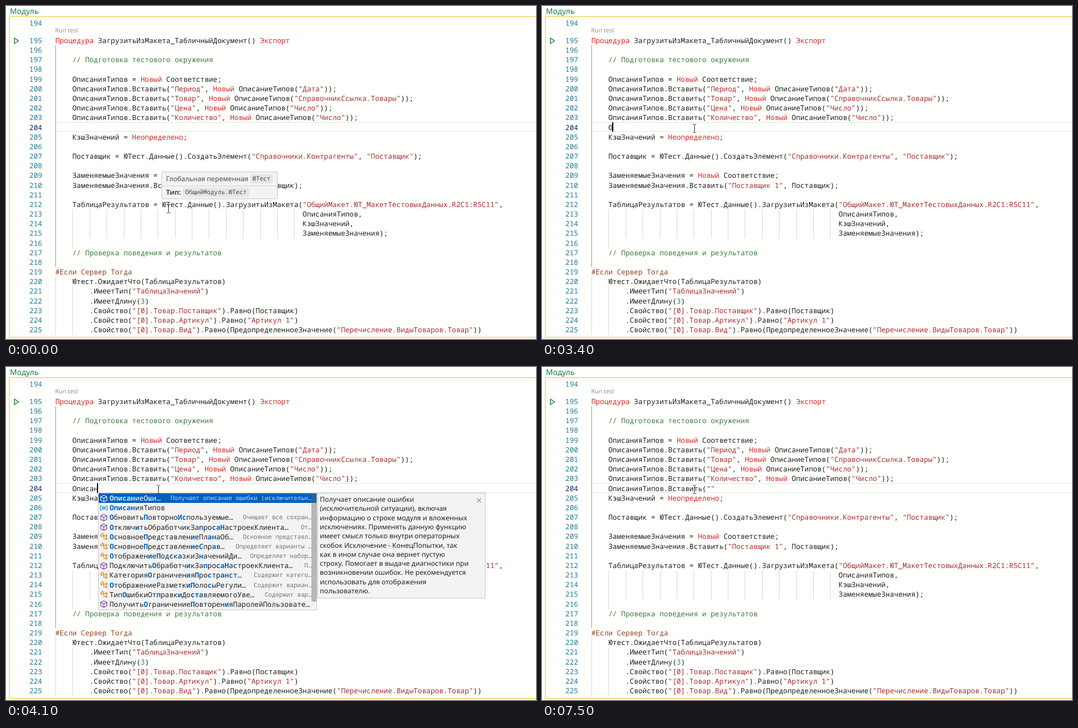
These frames come from a looping animation (944 px wide and 593 px high, 8 s). An HTML page:

```html
<!DOCTYPE html>
<html lang="ru">
<head>
<meta charset="utf-8">
<title>Модуль</title>
<style>
html, body { margin: 0; width: 100%; height: 100%; overflow: hidden; background: #fff; }
body { position: relative; text-rendering: geometricPrecision; color: #1c1c1c;
  font: 12.66px/17.17px "Noto Sans Mono", "DejaVu Sans Mono", monospace; }
div, svg { position: absolute; box-sizing: border-box; white-space: pre; }
#stage { left: 0; top: 0; width: 944px; height: 593px; overflow: hidden; }
.sans { font-family: "Noto Sans", "Open Sans", sans-serif; }
.title { left: 7px; top: .6px; font-size: 13.7px; color: #14794a; }
.frame { left: 5px; top: 18px; width: 960px; height: 573px; border: 2px solid #f6df7c; background: #fffffe; }
.shade { left: 7px; top: 23px; width: 937px; height: 1px; background: #eee; }
.current { left: 88px; top: 207px; width: 870px; height: 17px; border: 1px solid #e2e2e2; }
.guide { width: 1px; background: #d6d6d6; }
.guide.on { background: #979797; }
.num { left: 20px; width: 44.4px; text-align: right; color: #237893; }
.num.on { color: #0b216f; }
.lens { left: 87.5px; top: 36px; font-size: 10.6px; color: #919191; }
.kw { color: #cf2626; }
.str { color: #a02c2c; }
.com { color: #377a3a; }
.pre { color: #8c4420; }
.dig { color: #1f8a66; }
.box { background: #f3f3f3; border: 1px solid #c8c8c8; }
.hover { left: 277px; top: 295px; width: 207px; height: 49px; font-size: 12.15px; color: #4a4a4a; border-radius: 2px; }
.hover hr { position: absolute; margin: 0; border: 0; left: 0; right: 0; top: 24px; height: 1px; background: #d2d2d2; }
.chip { height: 16px; padding: 0 4px; border-radius: 3px; background: #e6e6e6;
  font: 10.76px/16px "Noto Sans Mono", "DejaVu Sans Mono", monospace; }
.list { top: 224px; width: 390px; }
.row { left: 0; width: 388px; height: 17.17px; }
.row svg { left: 2px; top: 1.5px; width: 14.4px; height: 14.4px; fill: none; stroke-width: 1.15; }
.row .label { left: 19.4px; top: 0; }
.row b { color: #0066bf; }
.row .info { right: 8.5px; top: 0; font-size: 10.76px; color: #717171; }
.row.on { background: #0060c0; color: #fff; }
.row.on svg { stroke: #fff; }
.row.on b { color: #bbe7ff; }
.row.on .info { color: #c3d9ef; }
.thumb { right: 0; top: 0; width: 9px; background: rgba(100, 100, 100, .42); }
.docs { top: 224px; width: 300px; padding: 3.2px 4px; font-size: 12.15px; line-height: 16.27px; color: #222; }
.docs svg { left: 283px; top: 8px; width: 9px; height: 9px; stroke: #444; }
#caret { top: 207px; height: 17px; background: #000; }
#mouse { left: -4px; top: -8px; width: 8px; height: 16px; fill: none; stroke: #222; }
</style>
</head>
<body>
<div id="stage">
  <div class="title sans">Модуль</div>
  <div class="frame"></div>
  <div class="shade"></div>
  <div class="current"></div>
  <div class="lens sans">Run test</div>
  <svg style="left:12px;top:55px" width="14" height="14" fill="none" stroke="#1f8036" stroke-width="1.4"><path d="M3 2.2 10.3 7 3 11.8Z"/></svg>
</div>
<script>
const CHAR = 7.596, LINE = 17.17, LEFT = 87.9;
const stage = document.getElementById('stage');

const code = `
Процедура ЗагрузитьИзМакета_ТабличныйДокумент() Экспорт

    // Подготовка тестового окружения

    ОписанияТипов = Новый Соответствие;
    ОписанияТипов.Вставить("Период", Новый ОписаниеТипов("Дата"));
    ОписанияТипов.Вставить("Товар", Новый ОписаниеТипов("СправочникСсылка.Товары"));
    ОписанияТипов.Вставить("Цена", Новый ОписаниеТипов("Число"));
    ОписанияТипов.Вставить("Количество", Новый ОписаниеТипов("Число"));

    КэшЗначений = Неопределено;

    Поставщик = ЮТест.Данные().СоздатьЭлемент("Справочники.Контрагенты", "Поставщик");

    ЗаменяемыеЗначения = Новый Соответствие;
    ЗаменяемыеЗначения.Вставить("Поставщик 1", Поставщик);

    ТаблицаРезультатов = ЮТест.Данные().ЗагрузитьИзМакета("ОбщийМакет.ЮТ_МакетТестовыхДанных.R2C1:R5C11",
${' '.repeat(58)}ОписанияТипов,
${' '.repeat(58)}КэшЗначений,
${' '.repeat(58)}ЗаменяемыеЗначения);

    // Проверка поведения и результатов

#Если Сервер Тогда
    Ютест.ОжидаетЧто(ТаблицаРезультатов)
        .ИмеетТип("ТаблицаЗначений")
        .ИмеетДлину(3)
        .Свойство("[0].Товар.Поставщик").Равно(Поставщик)
        .Свойство("[0].Товар.Артикул").Равно("Артикул 1")
        .Свойство("[0].Товар.Вид").Равно(ПредопределенноеЗначение("Перечисление.ВидыТоваров.Товар"))`.split('\n');

const lineTop = n => n === 194 ? 22 : 207.5 + (n - 204) * LINE;

function add(parent, cls, html = '', css = {}) {
  const el = document.createElement('div');
  el.className = cls;
  el.innerHTML = html;
  for (const k in css) el.style[k] = typeof css[k] === 'number' ? css[k] + 'px' : css[k];
  parent.append(el);
  return el;
}

const kinds = ['str', 'com', 'pre', 'kw', 'dig'];
const paint = s => s.replace(
  /("[^"]*")|(\/\/.*)|(#.*)|(Процедура|Экспорт|Новый|Неопределено)|((?<=\()\d+)/g,
  (m, ...g) => `<span class="${kinds[g.findIndex((x, i) => i < 5 && x)]}">${m}</span>`);

// Indent guides: column, first line, line after the last
function guide(col, from, to, cls = '') {
  add(stage, 'guide ' + cls, '', { left: Math.round(88 + col * CHAR), top: lineTop(from), height: (to - from) * LINE });
}
guide(0, 196, 219, 'on');
guide(0, 220, 226);
guide(4, 221, 226);
guide(4, 213, 217);
for (let col = 8; col <= 56; col += 4) guide(col, 213, 216);

let typed;
code.forEach((s, i) => {
  const n = 194 + i;
  add(stage, n === 204 ? 'num on' : 'num', n, { top: lineTop(n) });
  const el = add(stage, '', paint(s), { left: LEFT, top: lineTop(n) });
  if (n === 204) typed = el;
});

const hover = add(stage, 'hover box sans', '<hr>');
add(hover, '', 'Глобальная переменная', { left: 7, top: 3 });
add(hover, 'chip', 'ЮТест', { left: 157, top: 4 });
add(hover, '', '<b>Тип:</b>', { left: 7, top: 27 });
add(hover, 'chip', 'ОбщийМодуль.ЮТест', { left: 37, top: 28 });

const icons = {
  m: ['#652d90', 'M8 1.5 14 4.5V11.5L8 14.5 2 11.5V4.5ZM2 4.5 8 7.5 14 4.5M8 7.5V14.5'],
  v: ['#007acc', 'M4 4H1.5V12H4M12 4H14.5V12H12M8 5 11 6.5V9.5L8 11 5 9.5V6.5ZM5 6.5 8 8 11 6.5'],
  e: ['#d67e00', 'M1.5 5.5 5.5 1.5 8 4 4 8ZM6 6H11M8 6V12H11M13 4 15 6 13 8 11 6ZM13 10 15 12 13 14 11 12Z']
};

// Row: icon, label with *matched* letters, description
function makeList(rows, thumb) {
  const el = add(stage, 'list box', '', { height: rows.length * LINE + 3 });
  el.rows = rows.map(([icon, label, info = ''], i) => {
    const [color, d] = icons[icon];
    const row = add(el, 'row', `<svg viewBox="0 0 16 16" stroke="${color}"><path d="${d}"/></svg>`, { top: i * LINE });
    add(row, 'label', label.split('*').map((s, k) => k % 2 ? `<b>${s}</b>` : s).join(''));
    add(row, 'info', info);
    return row;
  });
  if (thumb) add(el, 'thumb', '', { height: thumb });
  return el;
}

function makeDocs(text, height) {
  return add(stage, 'docs box sans', text + '<svg viewBox="0 0 9 9"><path d="M1 1 8 8M8 1 1 8"/></svg>', { height });
}

const lists = {
  short: makeList([
    ['m', '*Опи*саниеОши…', 'Получает описание ошибки (исключительн…'],
    ['v', '*Опи*санияТипов'],
    ['e', '*Оп*ерат*и*вноеПроведе…', 'Варианты доступности оператив…'],
    ['m', '*Оп*овеститьОб*И*зме…', 'Уведомление не влияет на динамич…'],
    ['m', '*Оп*овест*и*ть', 'Посылает оповещение всем созданным фор…'],
    ['e', '*О*бновление*П*ри*И*змененииДа…', 'Содержит варианты режи…'],
    ['m', '*О*бновить*П*овторно*И*спользуемые…', 'Очищает все сохран…'],
    ['e', '*О*бновлен*и*е*П*редопределенныхД…', 'Определяет режим об…'],
    ['e', '*О*риентация*П*одп*и*сейДиагра…', 'Содержит варианты ориен…'],
    ['e', '*О*тображен*и*е*П*анелиРазд…', 'Содержит варианты режимов …'],
    ['e', '*О*тображен*и*е*П*одсказ…', 'Задает способ отображения подс…'],
    ['e', '*О*тображен*и*е*П*одсказкиЗначенийДи…', 'Определяет набор…']
  ], 26),
  long: makeList([
    ['m', '*Описан*иеОши…', 'Получает описание ошибки (исключительн…'],
    ['v', '*Описан*ияТипов'],
    ['m', '*О*бновить*П*овторно*Ис*пользуемые…', 'Очищает все сохран…'],
    ['m', '*О*тключ*и*тьОбработчикЗа*п*ро*са**Н*астроекКлиента…', 'От…'],
    ['e', '*О*сновное*П*редставлен*и*еПл*ан*аОб…', 'Основное представл…'],
    ['e', '*О*сновное*П*редставлен*и*е*С*пр*а*в…', 'Определяет варианты …'],
    ['e', '*О*тображен*и*е*П*од*с*к*а*зкиЗ*н*аченийДи…', 'Определяет набор…'],
    ['m', 'Подключить*О*бработч*и*кЗа*п*ро*са**Н*астроекКлиента…', 'П…'],
    ['e', 'Категория*О*граничен*и*я*П*ро*с*тр*ан*ст…', 'Содержит катего…'],
    ['e', '*О*тображениеРазметк*иП*оло*с*ыРегули…', 'Содержит вариан…'],
    ['e', 'Тип*О*шибкиОт*п*равк*и*До*ста*вляемогоУве…', 'Содержит вар…'],
    ['m', 'Получить*О*граничение*П*овторен*и*яПаролейПользовате…']
  ], 193),
  methods: makeList([
    ['m', 'Вставить', 'Устанавливает значение элемента соотве…'],
    ['m', 'Количество', 'Получает количество элементов соответс…'],
    ['m', 'Очистить', 'Удаляет все элементы соответствия.'],
    ['m', 'Получить', 'Получает значение по ключу. Работает а…'],
    ['m', 'Удалить', 'Удаляет элемент соответствия с заданны…']
  ])
};

const errorDocs = makeDocs(`Получает описание ошибки
(исключительной ситуации), включая
информацию о строке модуля и вложенных
исключениях. Применять данную функцию
имеет смысл только внутри операторных
скобок Исключение - КонецПопытки, так
как в ином случае она вернет пустую
строку. Помогает в выдаче диагностики при
возникновении ошибок. Не рекомендуется
использовать для отображения
пользователю.`, 188);
const insertDocs = makeDocs(`Устанавливает значение элемента
соответствия по ключу. Если элемент с
переданным значением ключа существует,
то его значение заменяется, в противном
случае добавляется новый элемент.`, 91);

const caret = add(stage, '');
caret.id = 'caret';
stage.insertAdjacentHTML('beforeend',
  '<svg id="mouse" viewBox="0 0 8 16"><path d="M1 .5H3L4 1.5 5 .5H7M4 1.5V14.5M1 15.5H3L4 14.5 5 15.5H7"/></svg>');
const mouse = document.getElementById('mouse');

// time, typed text, caret x (0 = hidden), caret width, list, selected row, docs
const word = 'ОписанияТипов';
const steps = [
  [0, '', 0],
  [2400, '', 118, 2],
  [2900, '', 0],
  [3400, 'О', 125, 2],
  [3500, 'Оп', 132, 2],
  [3600, 'Опи', 140, 2, 'short', 0],
  [3700, 'Опи', 140, 2, 'short', 0, errorDocs],
  [3900, 'Опис', 147, 2, 'short', 0, errorDocs],
  [4000, 'Описа', 155, 2, 'long', 0, errorDocs],
  [4100, 'Описан', 162, 2, 'long', 0, errorDocs],
  [4600, 'Описан', 0, 2, 'long', 0, errorDocs],
  [4700, 'Описан', 0, 2, 'long', 1, errorDocs],
  [4800, 'Описан', 0, 2, 'long', 1],
  [5000, word, 215, 2],
  [5500, word, 0],
  [5800, word + '.', 224, 1, 'methods', 0, insertDocs],
  [6200, word + '.', 0, 1, 'methods', 0, insertDocs],
  [6600, word + '.Вставить(', 291, 2],
  [7000, word + '.Вставить(""', 300, 1],
  [7500, word + '.Вставить(""', 0]
];
const path = [
  [0, 289.5, 361], [600, 288, 312], [700, 285.5, 267],
  [900, 282, 254], [1000, 278, 240], [1100, 274, 227], [1200, 271.5, 218]
];
const at = (table, t) => table.findLast(row => row[0] <= t);
const show = (el, on) => { el.style.display = on ? '' : 'none'; };

let last;
function draw(t) {
  const [, x, y] = at(path, t);
  mouse.style.transform = `translate(${x}px, ${y}px)`;
  show(hover, t < 700);

  const step = at(steps, t);
  if (step === last) return;
  last = step;
  const [, text, cx, cw, name, sel, docs] = step;
  typed.innerHTML = paint('    ' + text);
  show(caret, cx);
  caret.style.left = cx + 'px';
  caret.style.width = cw + 'px';
  const left = Math.round(118.4 + text.length * CHAR);
  for (const key in lists) {
    const list = lists[key];
    show(list, key === name);
    list.style.left = left + 'px';
    list.rows.forEach((row, i) => row.classList.toggle('on', i === sel));
  }
  for (const el of [errorDocs, insertDocs]) {
    show(el, el === docs);
    el.style.left = left + 390 + 'px';
  }
}

const start = performance.now();
function tick() {
  draw((performance.now() - start) % 8000);
  requestAnimationFrame(tick);
}
tick();
</script>
</body>
</html>
```
